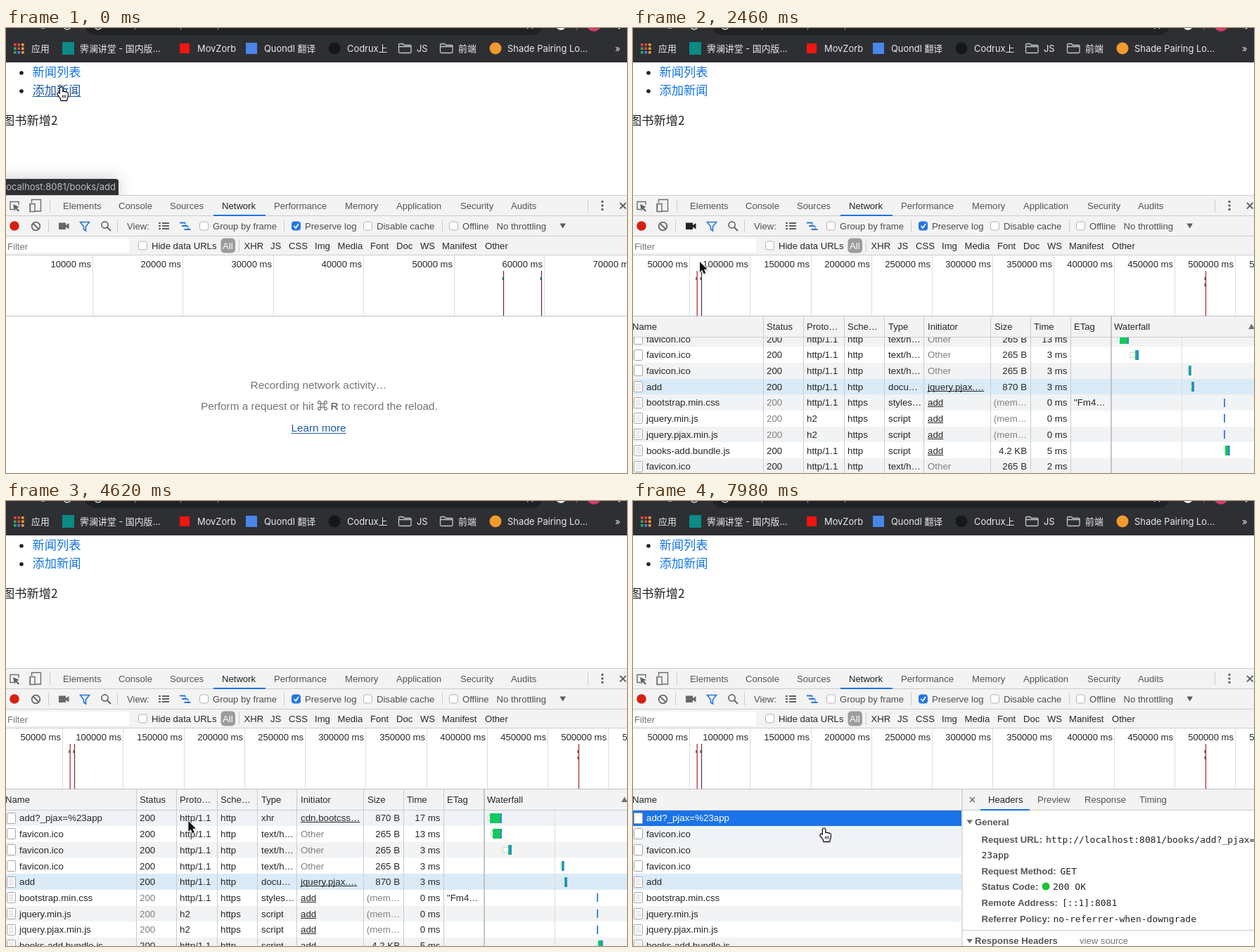
Recreate the animation shown at these times as an HTML page with a canvas. Size 883 by 634 pixels, loop 8 s.

```html
<!DOCTYPE html>
<html lang="zh">
<head>
<meta charset="utf-8">
<style>
  html, body { margin: 0; width: 100%; height: 100%; overflow: hidden; background: #fff; }
  canvas { display: block; }
</style>
</head>
<body>
<canvas id="stage" width="883" height="634"></canvas>
<script>
const W = 883, H = 634, LOOP = 8000, STEP = 60;
const LOADING = 1980, LOADED = 2160, OPENED = 7560;
const ROW_TOP = 440.3, ROW_H = 22.7;
const c = document.getElementById('stage').getContext('2d');

const SANS = '"Liberation Sans", Arial, sans-serif';
const UI = 'Inter, "Noto Sans CJK SC", "Noto Sans CJK", sans-serif';
const CJK = '"Noto Sans CJK SC", "Noto Sans CJK", sans-serif';
const MONO = '"DejaVu Sans Mono", monospace';
const INK = '#262729', GREY = '#808080', TAB = '#525457', BLUE = '#1a73e8', LINE = '#cccccc', MARK = '#b8d6f3';

// time, x, y of the pointer tip
const POINTER = [
  [0, 79, 85], [240, 76, 90], [540, 81, 85], [2000, 81, 85], [2460, 95, 333], [2760, 122, 505],
  [3360, 122, 505], [3660, 126, 461], [3840, 128, 456], [4200, 128, 456], [4980, 372, 456],
  [5280, 372, 462], [5460, 362, 455], [5700, 362, 455], [6180, 368, 453], [6660, 368, 453],
  [7380, 83, 450], [7560, 83, 450], [7980, 272, 467]
];
const HAND = new Path2D('M-2 1.2a1.6 1.6 0 0 1 3.2 0v5.3l.3-.1a1.4 1.4 0 0 1 2.6.3 1.4 1.4 0 0 1 2.5.6 1.3 1.3 0 0 1 2.2 1c.3 3.5-.3 5.5-1.5 7.5v2h-8v-2c-1.2-1.5-3.2-4.5-4.6-6.3-.8-1.3.8-2.3 2-1.2l1.3 1.3z');
const ARROW = new Path2D('M0 0v15l3.4-3.2 2.3 5.4 2.6-1.1-2.3-5.3h4.6z');
const RESIZE = new Path2D('M-1 -8h2v7h3v-3l4 4-4 4v-3h-3v7h-2v-7h-3v3l-4-4 4-4v3h3z');

const COLUMNS = [['Name', -1], ['Status', 190], ['Proto…', 247], ['Sche…', 305], ['Type', 363],
  ['Initiator', 419], ['Size', 514], ['Time', 570], ['ETag', 627], ['Waterfall', 684]];
const EDGES = [185.5, 242.5, 300.5, 357.5, 413.5, 508.5, 565.5, 622.5];
const PENDING = ['add?_pjax=%23app', 'favicon.ico', 'favicon.ico'].map((name, i) =>
  [name, '(pend…', '', 'http', i ? '' : 'xhr', i ? 'Other' : 'jquery.min.js:2', '0 B', 'Pendi…']);
const icon = time => ['favicon.ico', '200', 'http/1.1', 'http', 'text/h…', 'Other', '265 B', time];
const cached = (name, proto, type, tag) => [name, '200', proto, 'https', type, 'add', '(mem…', '0 ms', tag];
const REQUESTS = [
  ['add?_pjax=%23app', '200', 'http/1.1', 'http', 'xhr', 'cdn.bootcss…', '870 B', '17 ms'],
  icon('13 ms'), icon('3 ms'), icon('3 ms'),
  ['add', '200', 'http/1.1', 'http', 'docu…', 'jquery.pjax.…', '870 B', '3 ms'],
  cached('bootstrap.min.css', 'http/1.1', 'styles…', '"Fm4…'),
  cached('jquery.min.js', 'h2', 'script'),
  cached('jquery.pjax.min.js', 'h2', 'script'),
  ['books-add.bundle.js', '200', 'http/1.1', 'http', 'script', 'add', '4.2 KB', '5 ms'],
  icon('2 ms')
];
// queue start, green start, blue start, end
const BARS = [[685, 688, 703, 705], [689, 692, 703, 705], [706, 714, 716, 719], [788, 790, 791, 793.5],
  [792, 794, 795, 798], [840, 840, 840, 842], [840, 840, 840, 842], [840, 840, 840, 842], [840, 842, 846, 848.5]];

function rect(x, y, w, h, color) { c.fillStyle = color; c.fillRect(x, y, w, h); }
function box(x, y, w, h, r, fill, stroke) {
  c.beginPath(); c.roundRect(x, y, w, h, r);
  if (fill) { c.fillStyle = fill; c.fill(); }
  if (stroke) { c.strokeStyle = stroke; c.lineWidth = 1; c.stroke(); }
}
function disc(x, y, r, color) { c.beginPath(); c.arc(x, y, r, 0, 7); c.fillStyle = color; c.fill(); }
function path(d, color, width) {
  const p = new Path2D(d);
  if (width) { c.strokeStyle = color; c.lineWidth = width; c.stroke(p); }
  else { c.fillStyle = color; c.fill(p); }
}
const vline = (x, y0, y1, color = LINE, w = 1) => rect(x - w / 2, y0, w, y1 - y0, color);
const hline = (y, color = LINE, x = 0, w = W) => rect(x, y - .5, w, 1, color);

// y is the middle of the capitals; returns the right edge
function text(s, x, y, { color = INK, size = 13.1, font = SANS, weight = '', align = 'left', under, mark } = {}) {
  c.font = `${weight} ${size}px ${font}`;
  c.textAlign = align;
  const w = c.measureText(s).width;
  const left = align === 'right' ? x - w : align === 'center' ? x - w / 2 : x;
  const base = Math.round(y + size * .355);
  if (mark) rect(left - 1, Math.round(y - 7.5), w + 2, 15, MARK);
  c.fillStyle = color;
  c.fillText(s, x, base);
  if (under) rect(left, base + Math.round(size * .1), w, 1, color);
  return left + w;
}

function browserBar() {
  rect(0, 0, W, 49, '#2e2f33');
  box(112, -20, 651, 30, 15, '#202125');
  c.strokeStyle = '#d5d6d8'; c.lineWidth = 1.5;
  for (const x of [87, 131]) { c.beginPath(); c.arc(x, -3, 5, .3, 2.8); c.stroke(); }
  path('M16 0l-2-2M50 0h5M741 1l4-3 4 3', '#c8c9cb', 1.3);
  for (const x of [184, 249, 302]) path(`M${x} 0l-1 2.500`, '#a6a7aa', 1);
  disc(789, -4, 7, '#eeeeee');
  disc(836, -5, 10, '#d83a66');
  rect(811, 0, 1, 3, '#66686c');
  disc(872, 0, 1.5, '#ddd');
  const dots = ['#e8453c', '#e8453c', '#f0a030', '#3aa757', '#e8453c', '#f0a030', '#3aa757', '#4285f4', '#f0a030'];
  dots.forEach((color, i) => rect(11 + i % 3 * 5.5, 22 + (i / 3 | 0) * 5.5, 3.6, 3.6, color));
  rect(80, 20, 17, 18, '#0b8a86');
  rect(247, 22, 14, 14, '#f5150f');
  rect(341, 21, 16, 16, '#4a86e8');
  disc(467, 29, 8.5, '#15171a');
  disc(696, 29, 8.5, '#f29a2e');
  for (const x of [558.5, 617.5])
    path(`M${x} 24q0-1.5 1.5-1.5h4.5l2 2h8q1.5 0 1.5 1.5v8q0 1.5-1.5 1.5h-14.5q-1.5 0-1.5-1.5zM${x} 26.5h17`, '#c3c5c8', 1.3);
  const labels = [['应用', 36], ['霁澜讲堂 - 国内版...', 105], ['MovZorb', 272], ['Quondl 翻译', 367], ['Codrux上', 485],
    ['JS', 584], ['前端', 643], ['Shade Pairing Lo...', 713], ['»', 866]];
  for (const [s, x] of labels) text(s, x, 29, { color: '#e9eaec', font: UI, size: 12.9 });
}

function page(t) {
  const hover = t < 2100;
  disc(22, 64, 2.8, '#222');
  disc(22, 90, 2.8, '#222');
  text('新闻列表', 37.5, 63, { color: '#1274e4', font: CJK, size: 17.25 });
  text('添加新闻', 37.5, 89, { color: hover ? '#1c59a8' : '#1274e4', font: CJK, size: 17.25, under: hover });
  text('图书新增2', -5, 132, { color: '#222', font: CJK, size: 17.25 });
  if (t < 2220) {
    c.save();
    c.shadowColor = 'rgba(0,0,0,.22)'; c.shadowBlur = 24;
    box(-10, 215, 170, 30, 4, '#2e3033');
    c.restore();
    text('localhost:8081/books/add', 156, 226.5, { color: '#b9bcc0', font: UI, size: 13, align: 'right' });
  }
}

function checkbox(x, y, on) {
  box(x + .5, y - 6, 12, 12, 3, on ? '#2377e4' : '#fff', on ? '#2377e4' : '#b4b4b4');
  if (on) path(`M${x + 3.5} ${y}l2.5 3 4-6`, '#fff', 1.7);
}

function toolbars(t) {
  rect(0, 238, W, 86, '#f3f3f4');
  hline(238.5); hline(267.5); hline(296.5); hline(323.5);
  const tabs = [['Elements', 81], ['Console', 160], ['Sources', 233], ['Network', 307], ['Performance', 381], ['Memory', 482],
    ['Application', 555], ['Security', 646], ['Audits', 718]];
  for (const [s, x] of tabs) text(s, x, 253, { color: s === 'Network' ? '#222' : TAB });
  rect(295, 266, 74, 2, BLUE);
  path('M18 252v-4.5h-12v11h5M34.5 251v10.5h5M36.5 249v-4.5h13v16.5h-9M34 250.5h7v11h-7z', '#6a6c6f', 1.4);
  path('M10 251l9 4-3.7 1.3 3.7 4-1.5 1.5-3.8-4-1.7 3.5z', '#5f6164');
  for (const [x, y] of [[62, 253], [827, 253], [60, 282], [158, 282], [395, 282], [620, 282], [331, 310]]) vline(x + .5, y - 9, y + 9);
  for (const y of [247.5, 253, 258.5]) disc(848, y, 1.7, '#606265');
  path('M873 249l8.5 8.5m0-8.5l-8.5 8.5', '#606265', 1.8);

  disc(12, 282, 6.8, '#d8200f');
  c.beginPath(); c.arc(42.5, 282.5, 5.8, 0, 7); c.strokeStyle = '#646669'; c.lineWidth = 1.8; c.stroke();
  path('M38.5 278.5l8 8', '#646669', 1.8);
  path('M75 277.5h10v3.5l4.5-3v8.5l-4.5-3v3.5h-10z', t >= LOADED && t < 2700 ? '#222' : '#66686b');
  path('M105.5 276.5h13l-5 6.5v6l-3-2v-4z', '#2d74d6', 1.6);
  c.beginPath(); c.arc(140.5, 280.5, 4.6, 0, 7); c.strokeStyle = '#646669'; c.lineWidth = 1.7; c.stroke();
  path('M144 284l5 5', '#646669', 2);
  path('M217 278h3m2 0h10M217 282h3m2 0h10M217 286h3m2 0h10', '#5f6164', 2);
  path('M247 277.5h8M250 282h8.5m-5 5h9', '#2d74d6', 2.2);
  path('M255 277.5v4.5M259 282v5', '#2d74d6', 1);
  checkbox(275, 282); checkbox(406, 282, true); checkbox(508, 282); checkbox(630, 282); checkbox(188, 310);
  const controls = [['View:', 172], ['Group by frame', 294], ['Preserve log', 425], ['Disable cache', 527], ['Offline', 649], ['No throttling', 697.5]];
  for (const [s, x] of controls) text(s, x, 282, { color: '#4c4e51' });
  path('M787.5 278.5h8.5l-4.25 7z', '#5a5c5f');

  rect(0, 300, 175, 20, '#fff');
  text('Filter', 2, 311, { color: '#757575' });
  box(305.5, 299.5, 20.5, 21, 5, '#9c9c9c');
  text('All', 308, 310, { color: '#fff' });
  const filters = [['Hide data URLs', 207], ['XHR', 338.5], ['JS', 376], ['CSS', 402], ['Img', 439], ['Media', 471.5],
    ['Font', 518], ['Doc', 555], ['WS', 589], ['Manifest', 620], ['Other', 681]];
  for (const [s, x] of filters) text(s, x, 310);
}

function overview(t) {
  const late = t >= LOADING;
  const first = late ? 80.5 : 123.5, gap = late ? 86.25 : 128.45, unit = late ? 50000 : 10000;
  for (let i = 0; i < 11; i++) {
    const x = Math.floor(first + gap * i) + .5;
    vline(x, 324, 410, '#dddddd');
    text(`${unit * (i + 1)} ms`, x - 2.5, 336, { align: 'right' });
  }
  hline(410.5, '#bfbfbf');
  const marks = late ? [[91.2, '#b3202a'], [97.5, '#63303a']] : [[707.5, '#5d2b38'], [761.5, '#5d2b38']];
  if (t >= LOADED) marks.push([814.5, '#b3202a']);
  for (const [x, color] of marks) {
    vline(x, 346, 410, color, 1.2);
    rect(x - 2, 355, 1.5, 4, late ? '#555' : '#2b8a80');
  }
  if (t >= LOADED) rect(812.5, 364, 1.5, 4, '#555');
}

function emptyState() {
  const style = { color: '#717376', size: 15.3 }, bold = { ...style, weight: 'bold' };
  text('Recording network activity…', 444.5, 509, { ...style, align: 'center' });
  let x = text('Perform a request or hit ', 277, 539, style);
  x = text('⌘ R', x, 539, bold);
  text(' to record the reload.', x, 539, style);
  text('Learn more', 444.5, 569.5, { color: '#2059ac', size: 15.3, align: 'center', under: true });
}

function fileIcon(y, lined, mark) {
  box(1.5, Math.round(y) - 7.5, 12, 15, 1, mark ? '#cfe3f7' : '#fff', mark ? '#7fa9d2' : '#a5a5a5');
  if (lined) for (let i = 0; i < 4; i++) rect(4, y - 4 + i * 2.5, 7, 1, mark ? '#a5c3e2' : '#d2d2d2');
}

function waterfall([queue, green, blue, end], y) {
  if (green > queue) box(queue + .5, y - 3.5, green - queue, 7, 0, '#fff', '#c9d6cc');
  const h = end - queue > 2 ? 14 : 12;
  rect(green, y - h / 2, end - green, h, '#12c95c');
  rect(blue, y - h / 2, end - blue, h, green === queue ? '#3f83ea' : '#2f86cf');
}

function table(t, px, py) {
  const loaded = t >= LOADED, open = t >= OPENED, right = open ? 467 : W;
  const rows = loaded ? REQUESTS : PENDING;
  const scroll = loaded ? 31.5 * Math.min(1, Math.max(0, (3120 - t) / 360)) : 0;
  const firstVisible = Math.floor(scroll / ROW_H);
  const selectAll = t >= 5460 && t < 5940, selectType = t >= 6420;
  c.save();
  c.beginPath(); c.rect(0, 440, right, H - 440); c.clip();
  rows.forEach((row, i) => {
    const top = ROW_TOP + i * ROW_H - scroll, y = top + 11.4;
    const active = open && i === 0, hovered = py > 441 && py >= top && py < top + ROW_H && !selectAll;
    const striped = (i - firstVisible) % 2 === 0;
    const fill = active ? BLUE : loaded && i === 4 ? '#daebf7' : hovered ? '#eff3f7' : striped ? '#f2f3f4' : '#fff';
    rect(0, Math.round(top), W, ROW_H + 1, fill);
    const marked = selectAll && i > 0;
    fileIcon(y, loaded && i > 3, marked);
    text(row[0], 19, y, { size: 13.3, color: active ? '#fff' : INK, mark: marked });
    if (open) return;
    const dim = !loaded || row[6] === '(mem…';
    for (let k = 1; k < row.length; k++) {
      if (!row[k]) continue;
      const size = k === 6 || k === 7 && loaded;
      const faded = k === 1 && dim || k === 5 && row[k] === 'Other' || k === 6 && dim && loaded || k === 7 && !loaded;
      text(row[k], size ? (k === 6 ? 560 : 617.5) : COLUMNS[k][1] + (k === 7 ? 1 : 0), y, {
        size: 13.3, color: faded ? GREY : INK, align: size ? 'right' : 'left',
        under: k === 5 && row[k] !== 'Other',
        mark: marked || selectAll && k > 4 || selectType && i === 0 && k === 4
      });
    }
  });
  // white below the last row
  const bottom = Math.round(ROW_TOP + rows.length * ROW_H - scroll);
  rect(0, bottom, W, Math.max(0, H - bottom), '#fff');
  if (!open) {
    vline(loaded ? 780.5 : 787.5, 440, H, '#dddddd');
    if (loaded) BARS.forEach((bar, i) => waterfall(bar, Math.round(ROW_TOP + 11.4 + i * ROW_H - scroll)));
  }
  c.restore();

  rect(0, 411, W, 29, '#f3f3f4');
  hline(440.5);
  for (const [s, x] of open ? COLUMNS.slice(0, 1) : COLUMNS) text(s, x, 425.5);
  if (open) return details();
  for (const x of EDGES) vline(x, 411, H);
  vline(680, 411, H, '#b5b5b5', 1.5);
  path('M875 429h9l-4.5-7.5z', '#707275');
}

function details() {
  vline(468, 411, H, '#bdbdbd');
  path('M479 422l7 7m0-7l-7 7', '#5f6164', 1.4);
  for (const [s, x] of [['Headers', 505], ['Preview', 575], ['Response', 642], ['Timing', 720]])
    text(s, x, 425.5, { color: s === 'Headers' ? '#222' : TAB });
  rect(494, 439, 70, 2, BLUE);
  const label = { weight: 'bold', color: '#55575a' }, mono = { font: MONO, size: 13, color: '#222' };
  path('M474.5 454.5h8.5l-4.25 6z', '#6e6e6e');
  text('General', 486, 457, label);
  const fields = [['Request URL:', 482.5, 587, 'http://localhost:8081/books/add?_pjax=%'], ['Request Method:', 527, 607.5, 'GET'],
    ['Status Code:', 549.5, 597, '200 OK'], ['Remote Address:', 572.5, 610, '[::1]:8081'],
    ['Referrer Policy:', 595, 597.5, 'no-referrer-when-downgrade']];
  for (const [name, y, x, value] of fields) {
    text(name, 495.5, y, label);
    text(value, x, y, mono);
  }
  text('23app', 495.5, 504.5, mono);
  disc(587, 549, 5.5, '#1fc12f');
  hline(611.5, LINE, 468);
  path('M474.5 624h8.5l-4.25 6z', '#6e6e6e');
  text('Response Headers', 486, 626.5, label);
  text('view source', 635, 626.5, { color: '#777' });
}

function tooltip() {
  c.save();
  c.shadowColor = 'rgba(0,0,0,.25)'; c.shadowBlur = 6; c.shadowOffsetY = 2;
  box(135.5, 496.5, 205, 27, 1, '#f5f5f5');
  c.restore();
  box(135.5, 496.5, 205, 27, 1, null, '#c4c4c4');
  text('http://localhost:8081/favicon.ico', 144, 510, { size: 13.6 });
}

function pointerAt(t) {
  const i = POINTER.findIndex(k => k[0] > t);
  if (i < 0) return POINTER.at(-1).slice(1);
  const [t0, x0, y0] = POINTER[i - 1], [t1, x1, y1] = POINTER[i];
  const p = (t - t0) / (t1 - t0);
  return [x0 + (x1 - x0) * p, y0 + (y1 - y0) * p];
}

function pointer(t, x, y) {
  const hand = y < 100 || y > 440 && x < (t >= OPENED ? 467 : 185);
  const shape = hand ? HAND : y > 440 && Math.abs(x - 358) < 6 ? RESIZE : ARROW;
  c.save();
  c.translate(x, y);
  c.lineJoin = 'round';
  c.shadowColor = 'rgba(0,0,0,.3)'; c.shadowBlur = 2; c.shadowOffsetY = 1;
  c.lineWidth = hand ? 2.4 : 2;
  c.strokeStyle = hand ? '#111' : '#fff';
  c.stroke(shape);
  c.shadowColor = 'transparent';
  c.fillStyle = hand ? '#fff' : '#111';
  c.fill(shape);
  if (hand) path('M1.5 10.5v4M3.7 10.5v4M5.9 10.5v4', '#111', 1);
  c.restore();
}

function draw(now) {
  const t = Math.floor(now % LOOP / STEP) * STEP;
  const [x, y] = pointerAt(t);
  rect(0, 0, W, H, '#fff');
  browserBar();
  page(t);
  toolbars(t);
  overview(t);
  if (t < LOADING) emptyState(); else table(t, x, y);
  if (t >= 3540 && t < 3840) tooltip();
  pointer(t, x, y);
  requestAnimationFrame(() => draw(performance.now() - start));
}
const start = performance.now();
draw(0);
</script>
</body>
</html>
```
